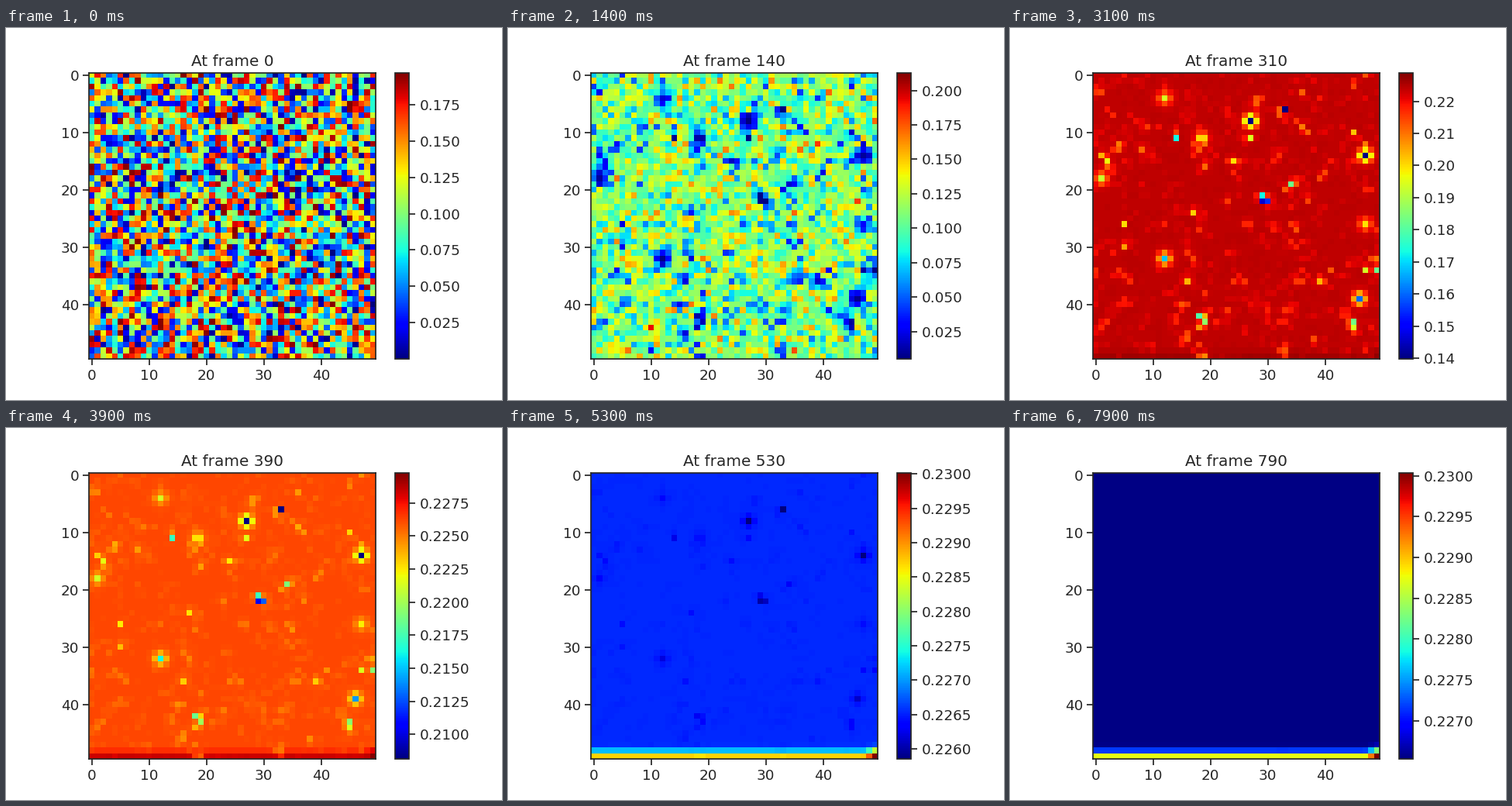
A matplotlib script that plays this animation: 640 px wide and 480 px high, repeating every 8 s.

```python
import numpy as np
import matplotlib.pyplot as plt
from matplotlib.animation import FuncAnimation

INK = ".15"
plt.rcParams.update({
    "font.family": "DejaVu Sans",
    "text.color": INK,
    "axes.edgecolor": INK,
    "axes.linewidth": 1.25,
    "axes.titlesize": 14.4,
})
for axis in ("xtick", "ytick"):
    plt.rcParams.update({
        f"{axis}.labelsize": 13.2,
        f"{axis}.color": INK,
        f"{axis}.major.size": 6,
        f"{axis}.major.width": 1.25,
    })

SIZE = 50
STEPS = 10      # simulation steps per picture
COUNT = 80
START = 80      # step at which regrowth takes over
CAP = 0.22655   # carrying capacity
TOP = 0.23005   # level the richest corner approaches
RATE = 0.0245

# Colour limits at a few steps
KEY_T = [0, 80, 190, 310, 450, 530, 650, 790]
KEY_LOW = np.array([.00005, .0032, .007, .1398, .22199, .22585, .22649, .22653])
KEY_HIGH = np.array([.1969, .2095, .2153, .2289, .22997, .23002, .23003, .23004])

# Slowest cells: row, column, delay
HOLES = [(8, 27, 4.2), (14, 47, 4.2), (39, 46, 3.6), (32, 12, 3.4),
         (4, 12, 2.7), (11, 18.5, 2.7), (18, 1, 2.7), (26, 47, 2.5)]


def logit(u):
    return np.log(u / (CAP - u))


def expit(x):
    return CAP / (1 + np.exp(-x))


def limits(n):
    low = expit(np.interp(n, KEY_T, logit(KEY_LOW)))
    high = TOP - np.exp(np.interp(n, KEY_T, np.log(TOP - KEY_HIGH)))
    return low, high


def blur(a):
    for axis in (0, 1):
        a = (np.roll(a, 1, axis) + 2 * a + np.roll(a, -1, axis)) / 4
    return a


rng = np.random.default_rng(7)
row, col = np.indices((SIZE, SIZE))
first = logit(rng.uniform(.0001, .1969, (SIZE, SIZE)))
flicker, grain, patches = rng.normal(size=(3, SIZE, SIZE))

# Skewed delay: most cells keep pace, a few lag far behind
lag = 0.7 * (np.exp(0.36 * grain + 1.28 * blur(patches)) - 1)
for r, c, depth in HOLES:
    lag = np.maximum(lag, depth * np.exp(-((row - r) ** 2 + (col - c) ** 2) / 2))

# Extra level along the bottom edge, highest in the corner
up, left = SIZE - 1 - row, SIZE - 1 - col
gain = (1 + .0096 * np.exp(-1.27 * up ** 2)
        + .0058 * np.exp(-.9 * left ** 2 - .15 * up ** 4))


def field(n):
    t = max(n - START, 0)
    fade = np.exp(-t / 60)
    grown = -1.75 + RATE * t + 0.6 * (1 - fade) - lag + 1.1 * fade * flicker
    s = min(n / START, 1)
    return expit((1 - s) * first + s * grown) * (1 + s * (gain - 1))


fig, ax = plt.subplots(figsize=(6.4, 4.8), dpi=100)
image = ax.imshow(field(0), cmap="jet", interpolation="nearest")
image.set_clim(*limits(0))
fig.colorbar(image)
title = ax.set_title("At frame 0")


def update(i):
    n = i * STEPS
    image.set_data(field(n))
    image.set_clim(*limits(n))
    title.set_text(f"At frame {n}")
    return image, title


anim = FuncAnimation(fig, update, frames=COUNT, interval=100, repeat=True)
plt.show()
```
